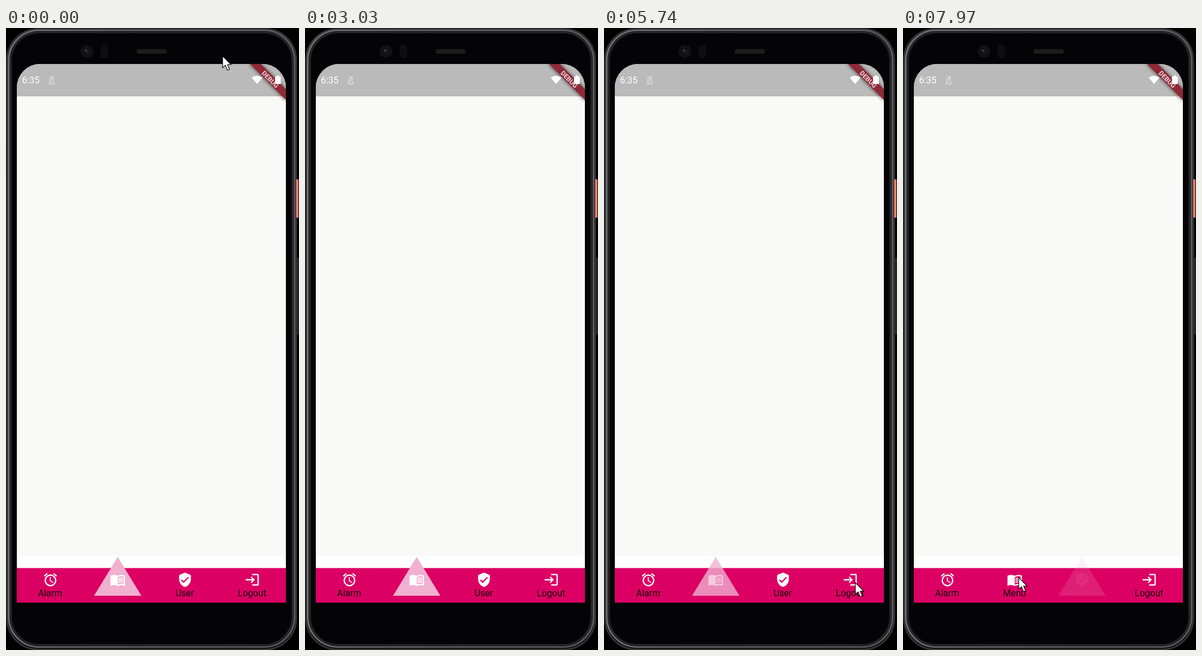
These frames come from a looping animation (514x1089 px, 8000 ms). An HTML page:

```html
<!DOCTYPE html>
<html lang="en">
<head>
<meta charset="utf-8">
<title>Bottom navigation</title>
<style>
  html, body { margin: 0; width: 100%; height: 100%; overflow: hidden; background: #000; }
  svg { display: block; width: 100vw; height: 100vh; }
  text { font-family: Roboto, "Noto Sans", sans-serif; font-size: 16px; }
</style>
</head>
<body>
<svg viewBox="0 0 514 1089">
  <defs>
    <clipPath id="screen"><path d="M19 1006V104A41 41 0 0 1 60 63H450A41 41 0 0 1 491 104V1006Z"/></clipPath>
    <linearGradient id="rim">
      <stop offset="0" stop-color="#77777a"/>
      <stop offset=".3" stop-color="#68686b"/>
      <stop offset="1" stop-color="#606063"/>
    </linearGradient>
    <radialGradient id="lens">
      <stop offset="0" stop-color="#242430"/>
      <stop offset=".4" stop-color="#111117"/>
      <stop offset="1" stop-color="#121214"/>
    </radialGradient>
    <filter id="soft"><feGaussianBlur stdDeviation="2.5"/></filter>
  </defs>

  <!-- phone body -->
  <rect width="514" height="1089"/>
  <g fill="none">
    <rect x="2" y="2" width="507" height="1086" rx="54" fill="#050508" stroke="#343437" stroke-width="3"/>
    <rect x="5" y="4.5" width="501" height="1079" rx="52" stroke="url(#rim)" stroke-width="3"/>
    <rect x="8" y="7" width="495" height="1074" rx="50" stroke="#262629" stroke-width="4"/>
    <rect x="11" y="9.500" width="489" height="1069" rx="48" fill="#040406" stroke="#0e0e10"/>
  </g>
  <rect x="509" y="265" width="4" height="67" fill="#ee7a6c"/>
  <rect x="510" y="402" width="4" height="135" fill="#262628"/>
  <circle cx="142" cy="41" r="11" fill="url(#lens)"/>
  <circle cx="140" cy="39" r="1.500" fill="#4a4a5c"/>
  <rect x="166" y="29" width="13" height="24" rx="6" fill="#0e0e10"/>
  <rect x="229" y="37" width="53" height="8" rx="3.500" fill="#1c1c19"/>

  <!-- screen -->
  <g clip-path="url(#screen)">
    <rect x="19" y="63" width="472" height="943" fill="#f9f9f8"/>
    <rect x="19" y="925" width="472" height="21" fill="#fff"/>
    <rect x="19" y="63" width="472" height="56" fill="#bababa"/>
    <rect x="19" y="118" width="472" height="1.500" fill="#b4b4a8"/>
    <path d="M425 63H449L491 105V129Z" opacity=".4" filter="url(#soft)"/>
    <path d="M428 63H447L491 107V126Z" fill="#8e2a38"/>
    <text transform="translate(463.500 90) rotate(45)" y="4" text-anchor="middle" fill="#ecd6d9" style="font-size:11.500px;font-weight:700">DEBUG</text>
    <g fill="#fff">
      <text x="28" y="97">6:35</text>
      <path d="M431 87Q440 80 450 87L440.500 98Z"/>
      <path d="M475 83h4v2h3v13h-10v-13h3Z"/>
    </g>
    <path d="M76 84l3 3m4-4l-2 4m-5 3h4v-3h3v3l-2 2 3 2v4h-8v-3h4m-5-4l4 2" fill="none" stroke="#eee"/>
    <rect x="19" y="945.500" width="472" height="60.500" fill="#dc0064"/>
    <g id="tabs"></g>
    <g id="badge">
      <path d="M0 926L41.500 994H-41.500Z" fill="#f0b0d0"/>
      <path id="badgeIcon" fill="#fff" transform="translate(-13.800 952.200) scale(1.150)"/>
    </g>
  </g>
  <path id="cursor" d="M0 0V20.500L4.800 16.200L8.400 24.800L12 23.200L8.500 15H14.800Z" fill="#fff" stroke="#000" stroke-width="1.100"/>
</svg>
<script>
const LOOP = 8000, FADE = 200, START_TAB = 1;
const $ = id => document.getElementById(id);

const bookLine = y => `M17.500 ${y}c.88 0 1.730.09 2.500.26v-1.520q-1.200-.24-2.500-.24-2.500 0-4.500.83v1.660q2-.99 4.500-.99z`;
const tabs = [
  { label: 'Alarm', icon: 'M22 5.720l-4.600-3.860-1.290 1.530 4.600 3.860zM7.880 3.390L6.600 1.860 2 5.710l1.290 1.530zM12.500 8H11v6l4.750 2.850.75-1.230-4-2.370V8zM12 4a9 9 0 1 0 0 18a9 9 0 0 0 0-18zm0 16a7 7 0 1 1 0-14a7 7 0 0 1 0 14z' },
  { label: 'Menu', icon: 'M21 5q-1.600-.5-3.500-.5-3.500 0-5.500 1.500-2-1.500-5.500-1.500T1 6v14.650q0 .5.500.5Q4 20 6.500 20q3.500 0 5.500 1.500 2.500-1.500 5.500-1.500 2.500 0 5 1.100.5 0 .5-.5V6q-1-.7-2-1zm0 13.500q-1.700-.5-3.500-.5-3 0-5.500 1.500V8q2.500-1.500 5.500-1.500 1.800 0 3.500.5z' + [10.5, 13.16, 15.83].map(bookLine).join('') },
  { label: 'User', icon: 'M11.190 1.360l-7 3.110Q3 5 3 6.300V11c0 5.550 3.840 10.740 9 12 5.160-1.260 9-6.450 9-12V6.300Q21 5 19.810 4.470l-7-3.110q-.8-.3-1.620 0zM10 17l-4-4 1.410-1.410L10 14.170l6.590-6.590L18 9z' },
  { label: 'Logout', icon: 'M11 7L9.600 8.400l2.600 2.600H2v2h10.200l-2.600 2.600L11 17l5-5zM20 19h-8v2h8q2 0 2-2V5q0-2-2-2h-8v2h8z' }
];
const tabX = i => 78 + 118 * i;

// [time, tab]
const taps = [[3600, 0], [4600, 1], [5700, 3], [7350, 2], [7805, 1]];

// [time, x, y] of the pointer tip
const track = [
  [0, 380, 49], [60, 380, 49], [600, 540, 60], [600, 60, 1120], [3200, 60, 1120],
  [3520, 77, 973], [3850, 77, 973], [4500, 198, 967], [4680, 198, 967],
  [5550, 441, 971], [6800, 441, 971], [7250, 326, 965], [7400, 326, 965],
  [7740, 203, 962], [LOOP, 203, 962]
];

$('tabs').innerHTML = tabs.map(({ label, icon }, i) => `
  <g transform="translate(${tabX(i)} 0)">
    <path d="${icon}" fill="#fff" transform="translate(-13.8 952.2) scale(1.15)"/>
    <text y="995" x="-.5" text-anchor="middle" fill="#16000a">${label}</text>
  </g>`).join('');

// The old badge fades out, then the new one fades in.
function badgeAt(t) {
  let tab = START_TAB, opacity = 1;
  for (const [time, next] of taps) {
    if (t < time) break;
    const phase = (t - time) / FADE;
    if (phase < 1) {
      opacity = 1 - phase;
    } else {
      tab = next;
      opacity = Math.min(1, phase - 1);
    }
  }
  return { tab, opacity };
}

function pointerAt(t) {
  const i = track.findIndex(key => t < key[0]);
  const [t0, x0, y0] = track[i - 1], [t1, x1, y1] = track[i];
  const p = (t - t0) / (t1 - t0), e = p * p * (3 - 2 * p);
  return [x0 + (x1 - x0) * e, y0 + (y1 - y0) * e];
}

function draw(t) {
  const { tab, opacity } = badgeAt(t);
  [...$('tabs').children].forEach((el, i) => el.setAttribute('visibility', i === tab ? 'hidden' : 'visible'));
  $('badge').setAttribute('transform', `translate(${tabX(tab)} 0)`);
  $('badge').setAttribute('opacity', opacity);
  $('badgeIcon').setAttribute('d', tabs[tab].icon);
  $('cursor').setAttribute('transform', `translate(${pointerAt(t)})`);
}

function tick() {
  draw(performance.now() % LOOP);
  requestAnimationFrame(tick);
}
tick();
</script>
</body>
</html>
```
